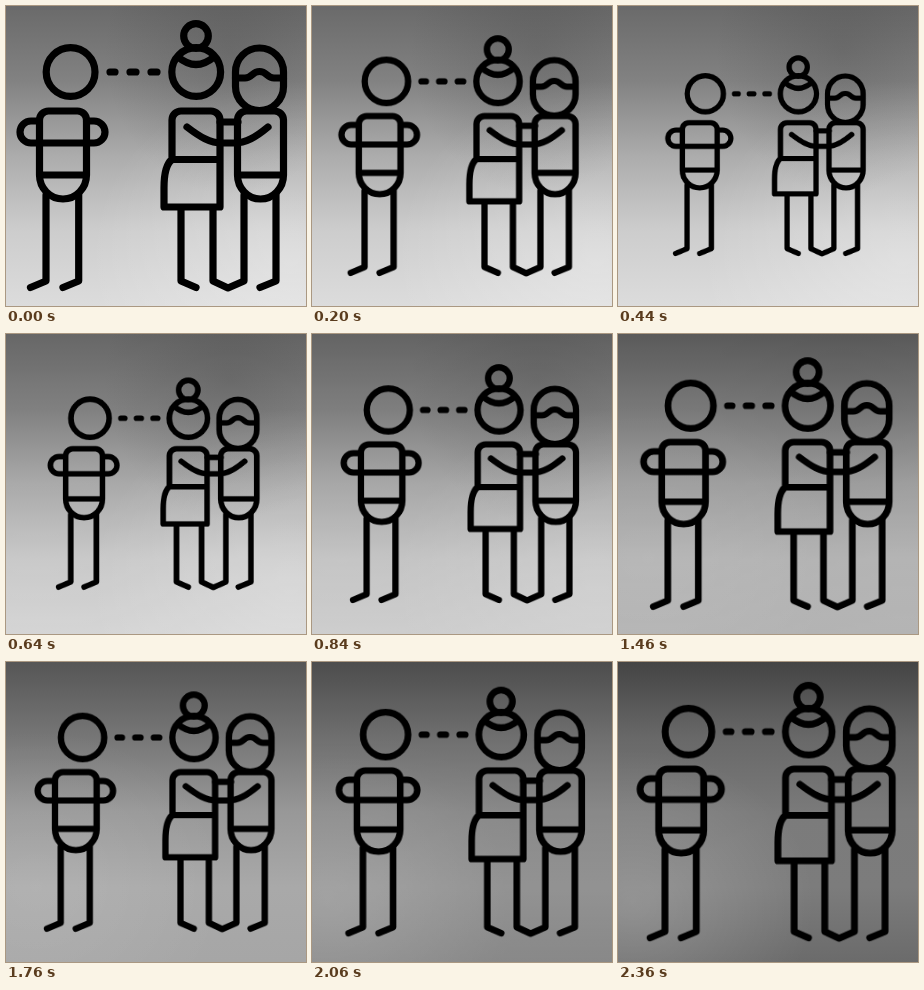
These frames come from a looping animation (300 px wide and 300 px high, 2.38 s). An HTML page:

```html
<!DOCTYPE html>
<html lang="en">
<head>
<meta charset="utf-8">
<title>Couple and onlooker</title>
<style>
  html, body { margin: 0; width: 100%; height: 100%; overflow: hidden; }
  .stage { position: relative; width: 100%; height: 100%; overflow: hidden; }
  .sky, svg { position: absolute; inset: 0; width: 100%; height: 100%; }

  .bright {
    background:
      radial-gradient(ellipse at 75% 15%, rgba(50,50,50,.2), transparent 40%),
      radial-gradient(ellipse at 95% 85%, rgba(255,255,255,.3), transparent 50%),
      linear-gradient(#6a6a6a, #828282 25%, #acacac 50%, #cdcdcd 75%, #dcdcdc);
  }
  .mid {
    background:
      radial-gradient(ellipse at 10% 75%, rgba(255,255,255,.1), transparent 50%),
      linear-gradient(#565656, #767676 25%, #989898 50%, #a9a9a9 75%, #a6a6a6);
    animation: toMid 2380ms linear infinite;
  }
  .dark {
    background:
      radial-gradient(ellipse at 5% 80%, rgba(255,255,255,.2), transparent 45%),
      linear-gradient(#444, #686868 25%, #7a7a7a 50%, #7b7b7b 75%, #6a6a6a);
    animation: toDark 2380ms linear infinite;
  }
  @keyframes toMid { 0%, 20% { opacity: 0 } 74%, 100% { opacity: 1 } }
  @keyframes toDark { 0%, 74% { opacity: 0 } 100% { opacity: 1 } }

  .people {
    fill: none; stroke: #000; stroke-width: 7.2;
    stroke-linecap: round; stroke-linejoin: round;
    transform-origin: 150px 150px;
    animation: pulse 2380ms cubic-bezier(.37, 0, .63, 1) infinite;
  }
  @keyframes pulse {
    0%     { transform: translateX(0) scale(1) }
    18.5%  { transform: translateX(.6px) scale(.741) }
    48.8%  { transform: translateX(2.3px) scale(.98) }
    73.5%  { transform: translateX(2.3px) scale(.887) }
    100%   { transform: translateX(2.2px) scale(.957) }
  }
</style>
</head>
<body>
<div class="stage">
  <div class="sky bright"></div>
  <div class="sky mid"></div>
  <div class="sky dark"></div>
  <svg viewBox="0 0 300 300">
    <g class="people">
      <!-- onlooker -->
      <circle cx="64.6" cy="66" r="24.4"/>
      <path d="M33.5 169V114a9 9 0 0 1 9-9H71.5a9 9 0 0 1 9 9V169a23.5 24 0 0 1-47 0H80.5"/>
      <path d="M33.5 115H25a11 11 0 0 0 0 22H88a11 11 0 0 0 0-22H80.5"/>
      <path d="M40 189V275L24.5 281.5M72.7 189V275L57 281.5"/>
      <path d="M104 66h5M124 66h6M145 66h6"/>
      <!-- woman -->
      <circle cx="190" cy="30" r="12.3"/>
      <circle cx="190.2" cy="66" r="24.4"/>
      <path d="M172 51Q190 66 208 51"/>
      <path d="M214 153.5H166V114a9 9 0 0 1 9-9h30a9 9 0 0 1 9 9V201H158V182C158 170 160 158 166 153.5"/>
      <path d="M175 202V275L190 281.5"/>
      <!-- man -->
      <rect x="229.5" y="42" width="48" height="62.5" rx="24"/>
      <path d="M229.5 72H239C246 72 246 65.5 253.5 65.5S261 72 268 72H277.5"/>
      <path d="M231.5 169V114a9 9 0 0 1 9-9H268.5a9 9 0 0 1 9 9V169a23 24 0 0 1-46 0H277.5"/>
      <path d="M207 202V275L222 282L238 275V189M270 189V275L254 281.5"/>
      <!-- embrace -->
      <path d="M181 121C194 131 204 137 216 137H228C240 137 250 131 262 121M214 116H232"/>
    </g>
  </svg>
</div>
</body>
</html>
```
